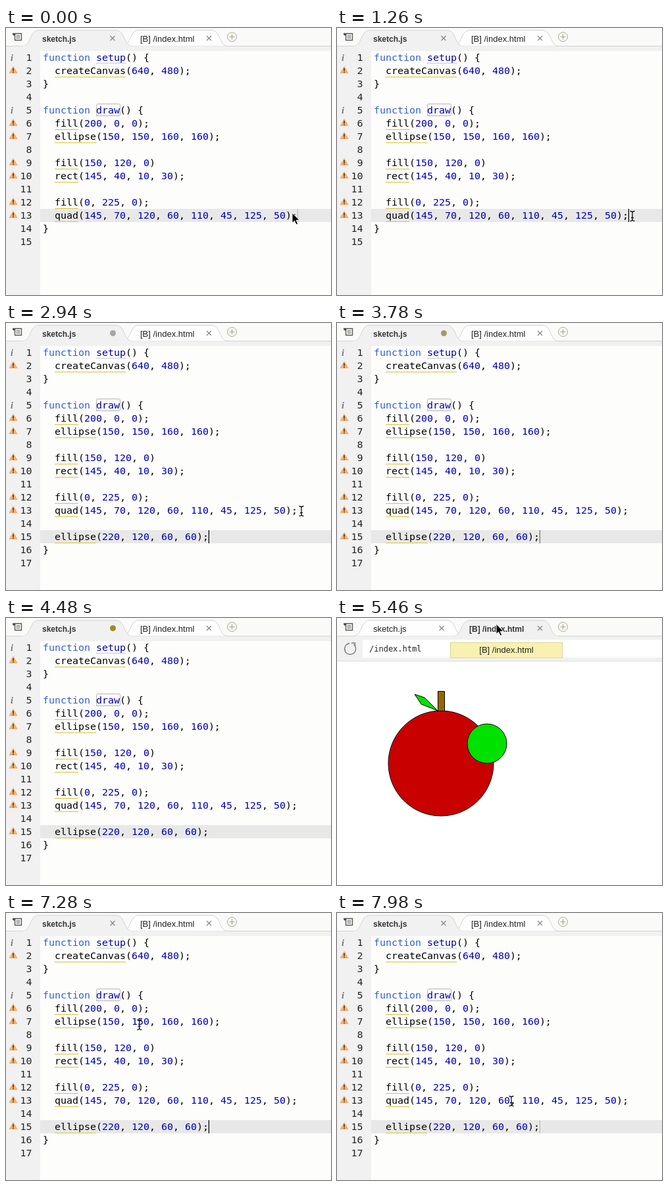
Recreate the animation shown at these times as an HTML page. Size 494 by 406 pixels, loop 8000 ms.

```html
<!DOCTYPE html>
<html lang="en">
<head>
<meta charset="utf-8">
<title>Sketch editor</title>
<style>
html, body { margin: 0; width: 100%; height: 100%; overflow: hidden; background: #fdfdfc; }
svg { display: block; width: 494px; height: 406px; }
text { white-space: pre; }
.code { font: 14.95px "DejaVu Sans Mono", "Noto Sans Mono", monospace; fill: #000; }
.num { fill: #222; text-anchor: end; }
.keyword { fill: #3560c8; }
.name { fill: #0000a2; }
.digit { fill: #0000b0; }
.info { font: italic bold 14px "Liberation Serif", "Noto Serif", serif; fill: #777; }
.ui { font: 13px "Liberation Sans", Arial, sans-serif; fill: #222; }
.ui.bold { font-weight: bold; font-size: 12px; fill: #333; }
.address { font: 12px "DejaVu Sans Mono", monospace; fill: #222; }
</style>
</head>
<body>
<svg viewBox="0 0 494 406" xmlns="http://www.w3.org/2000/svg">
  <rect width="494" height="406" fill="#fdfdfc"/>
  <g id="editor">
    <rect y="27" width="494" height="8" fill="#f0f1f0"/>
    <rect y="27" width="52" height="379" fill="#f0f1f0"/>
    <rect id="active" x="52" width="442" height="20" fill="#e8e8e8"/>
    <g id="lines"></g>
    <rect id="caret" width="1.2" height="20" fill="#000"/>
  </g>
  <g id="preview">
    <rect y="27" width="494" height="39" fill="#f0f1f0"/>
    <rect x="39" y="33" width="455" height="27" fill="#fff"/>
    <path d="M0 65.5H494" stroke="#dcdcdc"/>
    <path d="M25 40A8.5 8.5 0 1 1 19 38.5" fill="none" stroke="#777" stroke-width="1.3"/>
    <path d="M22 38H27.5V43.5" fill="none" stroke="#777" stroke-width="1.3"/>
    <text class="address" x="49" y="51">/index.html</text>
    <rect y="66" width="494" height="340" fill="#fff"/>
    <g transform="translate(8 71)" stroke="#000">
      <circle cx="150" cy="150" r="80" fill="#c80000"/>
      <path d="M145.5 40.5h10v30h-10z" fill="#966600"/>
      <path d="M145 70L120 60L110 45L125 50Z" fill="#00e100"/>
      <circle cx="220" cy="120" r="30" fill="#00e100"/>
    </g>
  </g>
  <g id="tabs"></g>
  <g id="tip">
    <rect id="tipBox" height="23" fill="#f8f1b1" stroke="#e0d58c"/>
    <text id="tipText" class="ui" text-anchor="middle">[B] /index.html</text>
  </g>
  <path id="arrow" d="M0 0V15.5L3.6 12.2L6 18L8.6 16.9L6.2 11.3H11Z" fill="#000" stroke="#fff"/>
  <path id="beam" d="M-3.5 -7.5Q0 -7.5 0 -5Q0 -7.5 3.5 -7.5M0 -5.5V5.5M-3.5 7.5Q0 7.5 0 5Q0 7.5 3.5 7.5M-2 2.5H2" fill="none" stroke="#111" stroke-width="1.3"/>
</svg>
<script>
const LOOP = 8000, STEP = 140;
const CHAR = 9, LEFT = 56, TOP = 35, ROW = 20;
const CHROME = '#f0f1f0';
const $ = id => document.getElementById(id);

const head = [
  'function setup() {', '  createCanvas(640, 480);', '}', '',
  'function draw() {', '  fill(200, 0, 0);', '  ellipse(150, 150, 160, 160);', '',
  '  fill(150, 120, 0)', '  rect(145, 40, 10, 30);', '',
  '  fill(0, 225, 0);', '  quad(145, 70, 120, 60, 110, 45, 125, 50);'
];
const added = '  ellipse(220, 120, 60, 60);';

// time, x, y
const pointer = [
  [0, 435, 281], [280, 458, 284], [420, 463, 285], [840, 449, 286],
  [4480, 449, 286], [4620, 400, 180], [4760, 295, 60], [4900, 243, 13],
  [5040, 242, 9], [6160, 242, 9], [6580, 157, 4], [6860, 100, 15],
  [7000, 108, 30], [7420, 250, 240], [7560, 250, 240], [7980, 265, 286]
];
// time, opacity
const blink = [
  [0, .2], [140, 0], [980, 0], [1260, 1], [3220, 1], [3500, 0], [3640, 0],
  [3920, 1], [4060, 1], [4340, 0], [6720, 0], [6860, 1], [7560, 1], [7980, .2]
];

const mix = (a, b, k) => a + (b - a) * k;
const clamp = k => Math.max(0, Math.min(1, k));

function track(keys, t) {
  const i = keys.findIndex(k => k[0] > t);
  if (i < 0) return keys[keys.length - 1].slice(1);
  const a = keys[i - 1], b = keys[i], k = (t - a[0]) / (b[0] - a[0]);
  return a.slice(1).map((v, j) => mix(v, b[j + 1], k));
}

function set(el, attrs) {
  for (const key in attrs) el.setAttribute(key, attrs[key]);
}

function show(el, on) {
  el.style.display = on ? '' : 'none';
}

function paint(line) {
  return line.replace(/function|setup|draw|\d+/g, word => {
    const kind = word === 'function' ? 'keyword' : /\d/.test(word) ? 'digit' : 'name';
    return `<tspan class="${kind}">${word}</tspan>`;
  });
}

function row(line, i, warn) {
  const y = TOP + ROW * i;
  let out = `<text class="code num" x="39.5" y="${y + 15}">${i + 1}</text>
    <text class="code" x="${LEFT}" y="${y + 15}">${paint(line)}</text>`;
  const call = line.match(/^  (\w+)\(/), def = line.match(/^function (\w+)/);
  if (def) {
    const x = LEFT + 9 * CHAR, w = def[1].length * CHAR;
    out += `<text class="info" x="7" y="${y + 15}">i</text>
      <path d="M${x} ${y + 18.5}h${w}" stroke="#8b99b5" stroke-dasharray="1 1"/>`;
    if (def[1] === 'draw')
      out += `<rect x="${x + .5}" y="${y + .5}" width="${w}" height="18" rx="2" fill="none" stroke="#b5b5b5"/>`;
  }
  if (call && warn) {
    out += `<path d="M${LEFT + 2 * CHAR} ${y + 19.5}h${call[1].length * CHAR}" stroke="#d2c636"/>
      <path d="M11 ${y + 3.5}L17 ${y + 13.5}H5Z" fill="#f2b071" stroke="#f2b071" stroke-linejoin="round"/>
      <path d="M11 ${y + 6}v4.5m0 1v1.6" stroke="#4a2a10" stroke-width="1.5"/>`;
  }
  return out;
}

function drawCode(t) {
  const chars = t < 2520 ? 2 : t < 2660 ? 16 : added.length;
  const lines = head.slice();
  if (t >= 1540) lines.push('');
  if (t >= 1960) lines.push(added.slice(0, chars));
  const current = lines.length - 1;
  const col = lines[current].length || 2;
  lines.push('}', '');
  const html = lines.map((line, i) => row(line, i, i !== 14 || t >= 2940)).join('');
  return { html, current, col };
}

function tab(x, end, fill) {
  return `<path d="M${x} 27.5C${x + 14} 27 ${x + 10} 3.5 ${x + 25} 3.5H${end - 25}
    C${end - 10} 3.5 ${end - 14} 27 ${end} 27.5" fill="${fill}" stroke="#d3d3d3"/>`;
}

const cross = (x, y) =>
  `<path d="M${x - 3.5} ${y - 3.5}l7 7m0 -7l-7 7" stroke="#888" stroke-width="1.3"/>`;

function drawTabs(preview, dot) {
  const sketch = tab(25, 192, preview ? '#fefefe' : CHROME);
  const page = tab(177, 337, preview ? CHROME : '#fefefe');
  const [from, to] = preview ? [178, 336] : [26, 191];
  return `<rect width="494" height="27" fill="#fafaf9"/>
    <path d="M0 27.5H494" stroke="#d3d3d3"/>
    ${preview ? sketch + page : page + sketch}
    <path d="M${from} 27.5H${to}" stroke="${CHROME}" stroke-width="1.5"/>
    <path d="M10 8.5H23.5V18.5H13.5V9" fill="none" stroke="#555" stroke-width="1.3"/>
    <path d="M15.5 11.5h6m-6 2h6m-6 2h6" stroke="#777"/>
    <path d="M9.5 9h5l-2.5 3z" fill="#444"/>
    <text class="ui ${preview ? '' : 'bold'}" x="55" y="20.5">sketch.js</text>
    <text class="ui ${preview ? 'bold' : ''}" x="${preview ? 201 : 204}" y="20.5">[B] /index.html</text>
    ${dot ? `<circle cx="162.5" cy="15.5" r="4.5" fill="${dot}"/>` : cross(preview ? 159 : 162, 15.5)}
    ${cross(308.5, 15.5)}
    <circle cx="343.5" cy="13.5" r="7" fill="none" stroke="#aaa68f"/>
    <path d="M339.5 13.5h8m-4 -4v8" stroke="#aaa68f" stroke-width="1.2"/>`;
}

function dotColor(t) {
  if (t < 1540 || t >= 4620) return '';
  const k = clamp((t - 3360) / 980);
  const rgb = [[165, 154], [165, 140], [165, 40]].map(c => Math.round(mix(c[0], c[1], k)));
  return `rgb(${rgb})`;
}

function render(time) {
  const t = Math.floor(time / STEP) * STEP;
  const preview = t >= 4900 && t < 6860;
  show($('editor'), !preview);
  show($('preview'), preview);

  const code = drawCode(t), y = TOP + ROW * code.current;
  $('lines').innerHTML = code.html;
  set($('active'), { y });
  set($('caret'), { x: LEFT + CHAR * code.col - .2, y, opacity: track(blink, t)[0] });
  $('tabs').innerHTML = drawTabs(preview, dotColor(t));

  show($('tip'), t >= 5460 && t < 6860);
  const k = clamp((t - 5460) / 280), x = mix(172.5, 169.5, k);
  set($('tipBox'), { x, y: mix(37.5, 39.5, k), width: 342.5 - x });
  set($('tipText'), { x: mix(257.5, 256, k), y: mix(53, 55, k) });

  const [px, py] = track(pointer, t);
  const hidden = t >= 3360 && t < 4620;
  const beam = t >= 140 && !preview && py > 40;
  show($('arrow'), !hidden && !beam);
  show($('beam'), !hidden && beam);
  set($(beam ? 'beam' : 'arrow'), { transform: `translate(${px} ${py})` });
}

let last = -1;
function loop() {
  const time = performance.now() % LOOP, step = Math.floor(time / STEP);
  if (step !== last) render(time);
  last = step;
  requestAnimationFrame(loop);
}
loop();
</script>
</body>
</html>
```
